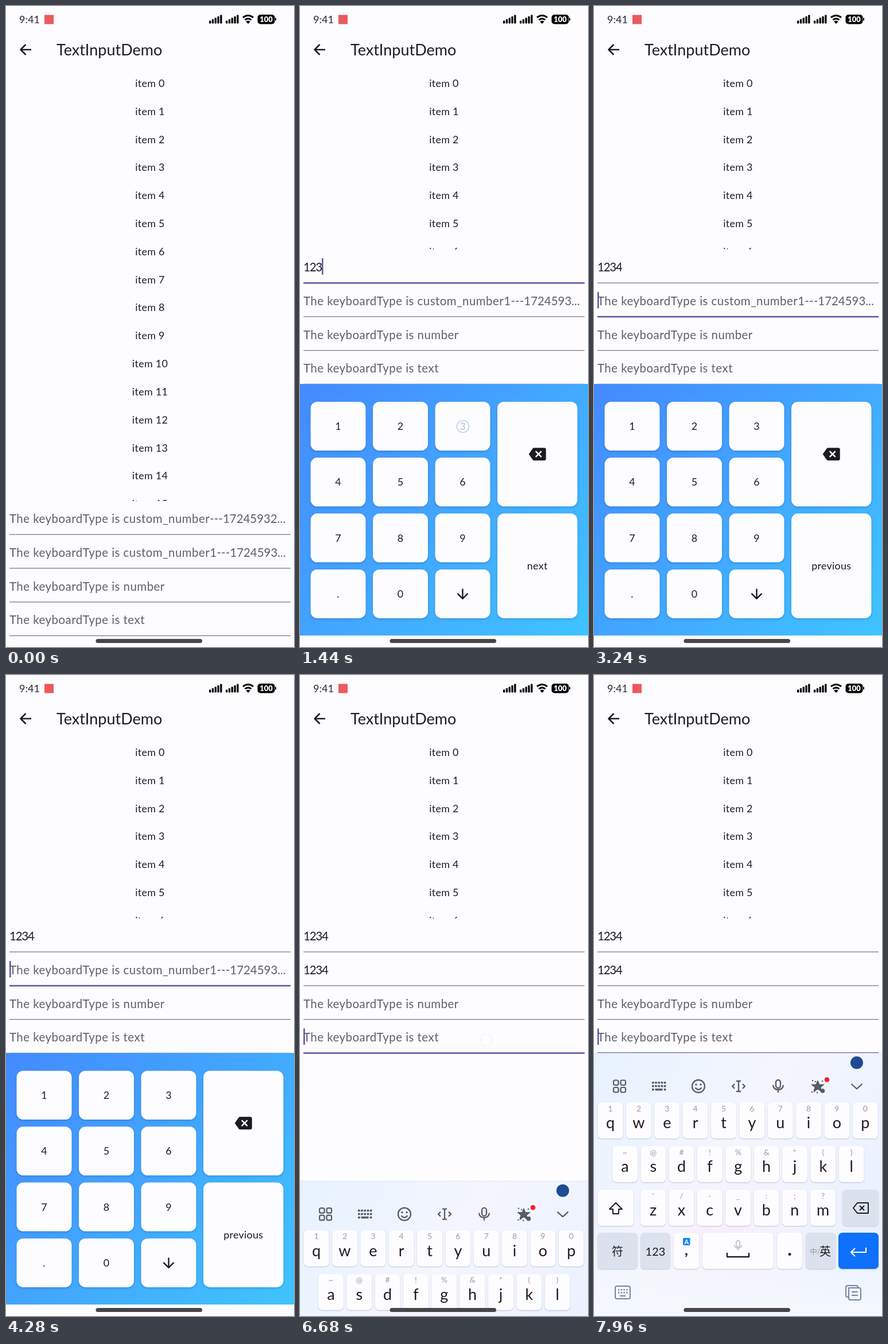
Write an HTML page with a canvas that moves like this. It is 502x1116 px and loops after 8 s.

```html
<!DOCTYPE html>
<html lang="en">
<head>
<meta charset="utf-8">
<title>TextInputDemo</title>
<style>
html, body { margin: 0; width: 100%; height: 100%; overflow: hidden; background: #fdfcff }
canvas { display: block }
</style>
</head>
<body>
<canvas id="stage" width="502" height="1116"></canvas>
<script>
const LOOP = 8000, W = 502, H = 1116;
const BG = '#fdfcff', INK = '#1d1b20', HINT = '#625e65', FOCUS = '#6150a6';
const PANEL_H = 438, PANEL_BOTTOM = 1096, FIELD_H = 58.7;
const ctx = document.getElementById('stage').getContext('2d');

// [time, x, y, key label]
const taps = [
  [80, 268, 894], [760, 70, 733, '1'], [1040, 178, 733, '2'], [1300, 284, 732, '3'],
  [1580, 68, 830, '4'], [2080, 414, 975, 'next'],
  [4740, 80, 728, '1'], [5000, 206, 721, '2'], [5300, 290, 730, '3'],
  [5580, 70, 829, '4'], [6380, 325, 636]
];
const focusTimes = [[200, 0], [2180, 1], [6500, 3]];
const hints = [
  ['custom_number', '---17245932...'], ['custom_number1', '---1724593...'], ['number', ''], ['text', '']
];

const clamp = v => Math.max(0, Math.min(1, v));
const easeOut = p => 1 - (1 - clamp(p)) ** 3;

function text(s, x, y, size, { color = INK, align = 'left', gap = 0, weight = 400, alpha = 1 } = {}) {
  ctx.globalAlpha = alpha;
  ctx.font = `${weight} ${size}px Lato, "Noto Sans CJK SC", "Noto Sans", sans-serif`;
  ctx.letterSpacing = gap + 'px';
  ctx.textAlign = align;
  ctx.fillStyle = color;
  ctx.fillText(s, x, y);
  ctx.globalAlpha = 1;
  return ctx.measureText(s).width;
}

function box(x, y, w, h, r, color) {
  ctx.fillStyle = color;
  ctx.beginPath();
  ctx.roundRect(x, y, w, h, r);
  ctx.fill();
}

function dot(x, y, r, color) {
  ctx.fillStyle = color;
  ctx.beginPath();
  ctx.arc(x, y, r, 0, 7);
  ctx.fill();
}

function icon(d, x, y, { stroke = INK, width = 2.2, fill } = {}) {
  const path = new Path2D(d);
  ctx.save();
  ctx.translate(x, y);
  ctx.lineWidth = width;
  ctx.lineJoin = 'round';
  if (fill) { ctx.fillStyle = fill; ctx.fill(path); }
  if (stroke) { ctx.strokeStyle = stroke; ctx.stroke(path); }
  ctx.restore();
}

function shadowed(color, blur, dy, draw) {
  ctx.save();
  ctx.shadowColor = color;
  ctx.shadowBlur = blur;
  ctx.shadowOffsetY = dy;
  draw();
  ctx.restore();
}

function statusBar() {
  text('9:41', 23, 30.3, 18, { color: '#38363b', weight: 500 });
  box(67, 15.5, 16, 16, 0, '#ea5a5c');
  for (const x of [354, 383])
    for (let i = 0; i < 5; i++) box(x + i * 4.8, 25.5 - i * 2.5, 3.3, 5 + i * 2.5, 1, '#000');
  icon('M-9-6Q0-13 9-6M-5.6-1.8Q0-6.3 5.6-1.8', 422, 26, { stroke: '#000', width: 2.9 });
  icon('M-3.8 1Q0-2 3.8 1L0 5Z', 422, 26, { stroke: null, fill: '#000' });
  box(438.5, 15, 30, 16.5, 5, '#000');
  box(469, 20.5, 2, 5, 1, '#000');
  text('100', 453.5, 28, 13, { color: '#fff', align: 'center', weight: 900 });
}

function appBar() {
  icon('M9.5 0H-8M0-9L-9 0 0 9', 34.5, 76, { width: 2.5 });
  text('TextInputDemo', 88, 86.4, 27);
}

function list(bottom) {
  ctx.save();
  ctx.beginPath();
  ctx.rect(0, 100, W, bottom - 100);
  ctx.clip();
  for (let i = 0; i < 16; i++)
    text('item ' + i, W / 2, 141 + i * 48.81, 17.9, { align: 'center', gap: .3 });
  ctx.restore();
}

function field(i, line, value, focused, caretOn) {
  const base = line - 20;
  let end = 6;
  if (value) {
    end += text(value, 6, base, 20.45, { gap: -1.2 });
  } else {
    const [kind, rest] = hints[i];
    const w = text('The keyboardType is ' + kind, 6, base, 20.45, { color: HINT, gap: .48 });
    text(rest, 6 + w, base, 20.45, { color: HINT });
  }
  const h = focused ? 2.5 : 1.3;
  box(6, line - h / 2, 490, h, 0, focused ? FOCUS : '#7c787f');
  if (focused && caretOn) box(end, line - 43, 2.5, 28.5, 0, FOCUS);
}

function keyAlpha(t, label) {
  let alpha = 1;
  for (const [start, , , key] of taps) {
    const age = t - start;
    if (key === label && age >= 0) alpha = Math.min(alpha, 1 - .6 * clamp(age / 60) * clamp((230 - age) / 90));
  }
  return alpha;
}

function numberPanel(t, top, action) {
  ctx.save();
  ctx.beginPath();
  ctx.rect(0, top, W, PANEL_BOTTOM - top);
  ctx.clip();
  const g = ctx.createLinearGradient(0, top, W, top + PANEL_H);
  g.addColorStop(0, '#448aff');
  g.addColorStop(1, '#40c4ff');
  box(0, top, W, PANEL_H, 0, g);

  const key = (x, y, w, h, label) => {
    shadowed('rgba(0,30,90,.25)', 4, 1.5, () => box(x, y, w, h, 11.5, BG));
    const cx = x + w / 2, cy = y + h / 2;
    if (label === 'down') {
      icon('M0-9V8M-9-.5L0 8.5 9-.5', cx, cy, { width: 2.4 });
    } else if (label === 'erase') {
      icon('M-15 0L-8-10Q-7-11-6-11H12Q15-11 15-8V8Q15 11 12 11H-6Q-7 11-8 10Z', cx, cy, { stroke: null, fill: INK });
      icon('M-3-5L7 5M7-5L-3 5', cx, cy, { stroke: BG, width: 2.5 });
    } else {
      text(label, cx, cy + 6.4, 17.9, { align: 'center', gap: .3, alpha: keyAlpha(t, label) });
    }
  };
  ['1', '2', '3', '4', '5', '6', '7', '8', '9', '.', '0', 'down'].forEach((label, i) =>
    key(18.5 + i % 3 * 108.5, top + 31 + Math.floor(i / 3) * 97.3, 96, 85, label));
  key(344, top + 31, 139.5, 182.3, 'erase');
  key(344, top + 225.6, 139.5, 182.3, action);
  ctx.restore();
}

function toolbar() {
  const grey = { stroke: '#585c64', width: 2.3 };
  for (const x of [33.5, 46])
    for (const y of [47.5, 60]) {
      ctx.strokeStyle = grey.stroke;
      ctx.lineWidth = 2.2;
      ctx.beginPath();
      ctx.roundRect(x + .5, y, 8.5, 8.5, 2.5);
      ctx.stroke();
    }
  for (let r = 0; r < 3; r++)
    for (let c = 0; c < 5; c++)
      if (r < 2 || c === 0 || c === 4) box(101 + c * 5.2, 50 + r * 6, 3.6, 3.6, .5, grey.stroke);
  box(106.5, 62, 13, 3.6, .5, grey.stroke);
  icon('M11 0A11 11 0 1 1-11 0A11 11 0 1 1 11 0M-5.5 2.5Q0 9 5.5 2.5', 182, 58, grey);
  dot(178, 55, 1.7, grey.stroke);
  dot(186, 55, 1.7, grey.stroke);
  icon('M-4-9H4M0-9V9M-4 9H4M-7-4L-11 0-7 4M7-4L11 0 7 4', 252, 58, grey);
  icon('M-4-6A4 4 0 0 1 4-6V0A4 4 0 0 1-4 0ZM-9-1Q-8 7 0 7T9-1M0 7V12', 321, 57, grey);
  icon('M0-10L3-3 11-3 5 2 7 10 0 5-7 10-5 2-11-3-3-3Z', 390, 58, { ...grey, width: 1, fill: grey.stroke });
  for (const [x, y] of [[380, 47], [385, 49], [397, 48], [379, 67], [383, 63], [388, 68]]) box(x, y, 2.2, 2.2, 0, grey.stroke);
  dot(398.5, 66, 3.8, grey.stroke);
  dot(406, 46.5, 4.3, '#f3202d');
  icon('M-9.5-4L0 4.5 9.5-4', 458, 58, grey);
  dot(458, 17, 11, '#1f4b94');
}

function textKeyboard(top) {
  ctx.save();
  ctx.translate(0, top);
  const g = ctx.createLinearGradient(0, 0, W, 300);
  g.addColorStop(0, '#e7f2ff');
  g.addColorStop(.5, '#f4f6fe');
  g.addColorStop(1, '#e9f1fe');
  box(0, 0, W, H - 658, 0, g);
  const glow = ctx.createRadialGradient(225, 320, 10, 225, 320, 190);
  glow.addColorStop(0, 'rgba(248,238,250,.9)');
  glow.addColorStop(1, 'rgba(248,242,252,0)');
  box(0, 100, W, 358, 0, glow);
  const fade = ctx.createLinearGradient(0, 330, 0, 458);
  fade.addColorStop(0, 'rgba(247,248,254,0)');
  fade.addColorStop(1, '#f5f8fe');
  box(0, 330, W, 128, 0, fade);
  box(0, 0, W, 1, 0, '#e0e8f3');
  toolbar();

  const cap = (x, y, w, color = BG) =>
    shadowed('rgba(90,110,150,.35)', 2, 1, () => box(x, y, w, 63, 7, color));
  const row = (letters, marks, x, y) => [...letters].forEach((c, i) => {
    const cx = x + i * 49.35;
    cap(cx - 22, y, 44);
    text(marks[i], cx, y + 15.5, 14, { color: '#9a9ca2', align: 'center' });
    text(c, cx, y + 45, 27, { align: 'center' });
  });
  row('qwertyuiop', '1234567890', 28.6, 86);
  row('asdfghjkl', '~@#!%&*()', 53.9, 162);
  row('zxcvbnm', "'/-_:;?", 103, 238);

  const grey = '#dbe2ed', thin = { width: 2 };
  cap(6, 238, 63);
  icon('M0-10L11 1H5V9H-5V1H-11Z', 38, 271, thin);
  cap(433, 238, 63, grey);
  icon('M-13 0L-6-9H13V9H-6ZM-2-4L6 4M6-4L-2 4', 465, 270, thin);

  cap(6, 313, 70, grey);
  text('符', 41, 353, 20, { align: 'center' });
  cap(81, 313, 52, grey);
  text('123', 107, 353, 20, { align: 'center' });
  cap(139, 313, 44);
  box(155, 322, 12.5, 13, 2, '#1688f5');
  text('A', 161.2, 332.5, 11, { color: '#fff', align: 'center', weight: 700 });
  text(',', 161, 352, 25, { align: 'center', weight: 700 });
  cap(189, 313, 124);
  icon('M-3-5A3 3 0 0 1 3-5V0A3 3 0 0 1-3 0ZM-6.5-1Q-6 5 0 5T6.5-1M0 5V9', 251, 335, { stroke: '#b5b6bb', width: 1.4 });
  icon('M-19-4V3H19V-4', 251, 352, { width: 2.3 });
  cap(319, 313, 44);
  text('.', 341, 353, 28, { align: 'center', weight: 900 });
  cap(369, 313, 52, grey);
  text('中/', 376, 350, 13, { color: '#94989f' });
  text('英', 403, 353, 20, { align: 'center' });
  cap(426, 313, 70, '#0e70fb');
  icon('M13-6V2H-12M-6-5L-13 2-6 9', 461, 345, { stroke: '#fff', width: 2.2 });

  const soft = { stroke: '#74879f', width: 2 };
  icon('M-10-11H10Q13-11 13-8V8Q13 11 10 11H-10Q-13 11-13 8V-8Q-13-11-10-11ZM-5 6H5', 50, 417, soft);
  for (let i = 0; i < 8; i++) box(42 + i % 4 * 4.7, 411 + (i >> 2) * 5, 2.4, 2.4, 0, soft.stroke);
  icon('M-8-8H10Q13-8 13-5V10Q13 13 10 13H-5Q-8 13-8 10ZM-9 8H-10Q-13 8-13 5V-9Q-13-12-10-12H5Q8-12 8-9M-3-1H8M-3 5H8', 452, 417, soft);
  ctx.restore();
}

function rings(t) {
  for (const [start, x, y] of taps) {
    const age = t - start;
    if (age < 0 || age > 320) continue;
    ctx.globalAlpha = clamp((320 - age) / 100);
    dot(x, y, 10.5, 'rgba(255,255,255,.3)');
    ctx.strokeStyle = 'rgba(125,165,235,.65)';
    ctx.lineWidth = 1.2;
    ctx.stroke();
    ctx.globalAlpha = 1;
  }
}

function draw(t) {
  let focus = -1, caretStart = 0;
  for (const [at, i] of focusTimes) if (t >= at) { focus = i; caretStart = at; }
  const values = ['', '', '', ''];
  for (const [start, , , key] of taps)
    if (key > '0' && key <= '9' && t >= start + 100) {
      values[start < 2180 ? 0 : 1] += key;
      caretStart = Math.max(caretStart, start + 100);
    }
  const caretOn = (t - caretStart) % 1000 < 500;
  const bottom = PANEL_BOTTOM - PANEL_H * easeOut((t - 240) / 325);

  box(0, 0, W, H, 0, BG);
  statusBar();
  appBar();
  list(bottom - 4 * FIELD_H + .5);
  values.forEach((v, i) => field(i, bottom - (3 - i) * FIELD_H + .3, v, i === focus, caretOn));
  if (t >= 240 && t < 6500) numberPanel(t, bottom, t < 2180 ? 'next' : 'previous');
  if (t >= 6600) textKeyboard(H - (H - 658) * easeOut((t - 6600) / 379));
  rings(t);
  box(156.5, 1102, 185.5, 7, 3.5, '#48464b');
}

const begin = performance.now();
function tick() {
  draw((performance.now() - begin) % LOOP);
  requestAnimationFrame(tick);
}
tick();
</script>
</body>
</html>
```
